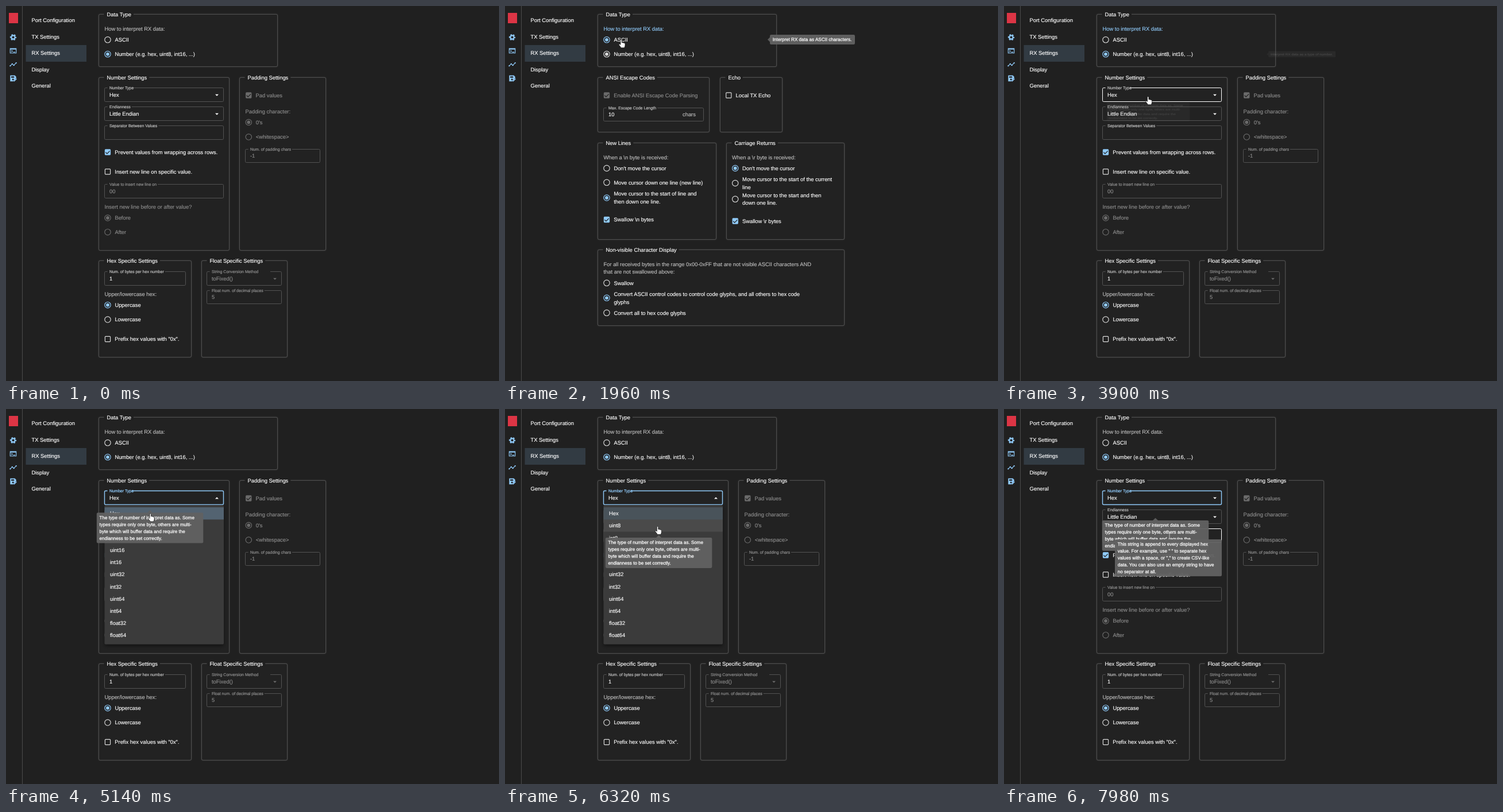
An HTML page for the animation above (8 s loop, 858 by 653 pixels).

```html
<!DOCTYPE html>
<html lang="en">
<head>
<meta charset="utf-8">
<title>RX settings</title>
<style>
  html, body { margin: 0; width: 100%; height: 100%; overflow: hidden; background: #202020; }
  svg { display: block; }
  text { font-family: "Liberation Sans", Arial, sans-serif; font-size: 9.37px; stroke-width: .15px; text-rendering: geometricPrecision; white-space: pre; }
  .label { font-size: 7.05px; stroke-width: .22px; }
  .tip text { font-size: 8.1px; stroke-width: .25px; }
</style>
</head>
<body>
<svg id="stage" width="858" height="653" viewBox="0 0 858 653">
  <defs>
    <filter id="glow" x="-10%" y="-10%" width="120%" height="120%">
      <feDropShadow dx="0" dy="0" stdDeviation="1.2" flood-color="#fff" flood-opacity=".13"/>
    </filter>
    <filter id="shade" x="-10%" y="-10%" width="120%" height="120%">
      <feDropShadow dx="0" dy="3" stdDeviation="3" flood-color="#000" flood-opacity=".45"/>
    </filter>
  </defs>
</svg>
<script>
const BG = '#202020', WHITE = '#fff', SOFT = '#bcbcbc', DIM = '#8c8c8c', OFF = '#6b6b6b',
      LINE = '#535353', BLUE = '#90caf9', RING = '#dcdcdc';
const stage = document.getElementById('stage');
let layer = stage;

function el(tag, attrs, parent = layer) {
  const n = document.createElementNS('http://www.w3.org/2000/svg', tag);
  set(n, attrs);
  parent.appendChild(n);
  return n;
}
function set(n, attrs) {
  for (const k in attrs) n.setAttribute(k, attrs[k]);
}
function group(draw, attrs = {}) {
  const outer = layer, g = el('g', attrs);
  layer = g;
  draw();
  layer = outer;
  return g;
}
const show = (n, on) => n.style.display = on ? '' : 'none';
const snap = v => Math.floor(v) + .5;
const ink = c => ({ fill: c, stroke: c });

// y is the middle of the capitals
function text(x, y, s, color = WHITE, cls = '') {
  const size = cls ? 7.05 : 9.37;
  const n = el('text', { x, y: y + size * .36, class: cls, ...ink(color) });
  n.textContent = s;
  return n;
}
function box(x1, y1, x2, y2, attrs) {
  return el('rect', { x: x1, y: y1, width: x2 - x1, height: y2 - y1, ...attrs });
}
function panel(x1, y1, x2, y2, title) {
  [x1, y1, x2, y2] = [x1, y1, x2, y2].map(snap);
  box(x1, y1, x2, y2, { rx: 2.5, fill: BG, stroke: '#505050', filter: 'url(#glow)' });
  const gap = box(x1 + 9, y1 - 5, x1 + 10, y1 + 5, { fill: BG });
  const t = text(x1 + 14, y1, title);
  gap.setAttribute('width', t.getComputedTextLength() + 9);
}
function field(x1, y1, x2, y2, label, value, { off = false, caret = false, notch = 0 } = {}) {
  [x1, y1, x2, y2] = [x1, y1, x2, y2].map(snap);
  const frame = el('path', { fill: 'none' });
  const name = text(x1 + 8.5, y1 - .5, label, off ? DIM : SOFT, 'label');
  const end = notch || x1 + 10.5 + name.getComputedTextLength();
  frame.setAttribute('d', `M${end} ${y1}H${x2 - 2}q2 0 2 2V${y2 - 2}q0 2-2 2H${x1 + 2}q-2 0-2-2V${y1 + 2}q0-2 2-2H${x1 + 5}`);
  text(x1 + 8.5, (y1 + y2) / 2, value, off ? DIM : WHITE);
  const arrow = caret && el('path', { fill: off ? OFF : WHITE });
  const cx = x2 - 11.5, cy = (y1 + y2) / 2 + .7;
  return {
    state(mode, open) {
      set(frame, {
        stroke: { focus: BLUE, hover: WHITE }[mode] || LINE,
        'stroke-width': mode === 'focus' ? 1.4 : 1
      });
      set(name, ink(mode === 'focus' ? BLUE : off ? DIM : SOFT));
      if (arrow) {
        const s = open ? -1 : 1;
        set(arrow, { d: `M${cx - 3} ${cy - 1.4 * s}h6l-3 ${3 * s}z` });
      }
      return this;
    }
  };
}
const plain = (...a) => field(...a).state();

function radio(x, y, s, on = false, off = false, lines = [y]) {
  const ring = el('circle', { cx: x, cy: y, r: 5.2, fill: 'none', 'stroke-width': 1.15 });
  const dot = el('circle', { cx: x, cy: y });
  [].concat(s).forEach((part, i) => text(x + 12.4, lines[i], part, off ? DIM : WHITE));
  const state = (lit, size) => {
    const c = off ? OFF : lit ? BLUE : RING;
    set(ring, { stroke: c });
    set(dot, { fill: c, r: 2.9 * size });
  };
  state(on, on ? 1 : 0);
  return state;
}
function check(x, y, s, on, off) {
  const c = off ? OFF : on ? BLUE : RING;
  box(x - 4.6, y - 4.6, x + 4.6, y + 4.6, { rx: 1, fill: on ? c : 'none', stroke: c, 'stroke-width': 1.15 });
  if (on) el('path', { d: `M${x - 3.6} ${y + .3}l2.5 2.4 4.8-4.9`, fill: 'none', stroke: BG, 'stroke-width': 1.2 });
  text(x + 12.3, y, s, off ? DIM : WHITE);
}
function icon(y, draw) {
  group(draw, { transform: `translate(5.6 ${y - 6.9}) scale(.575)`, fill: 'none', stroke: BLUE, 'stroke-width': 2 });
}

// Side bar
el('path', { d: 'M28.5 0V653', stroke: '#4a4a4a' });
box(5, 12, 21, 30, { fill: '#dc3545' });
icon(54.5, () => {
  el('circle', { cx: 12, cy: 12, r: 5.5, 'stroke-width': 3.8 });
  el('circle', { cx: 12, cy: 12, r: 8.3, 'stroke-width': 3, 'stroke-dasharray': '5 3.69', 'stroke-dashoffset': 2.5 });
});
icon(78, () => {
  el('path', { d: 'M3 5H21V19H3ZM3 7H21M6.5 10l3 3-3 3M12 16h6' });
});
icon(102, () => {
  el('path', { d: 'M3 16L9 10 14 14 21 7' });
  [[3, 16], [9, 10], [14, 14], [21, 7]].forEach(([cx, cy]) => el('circle', { cx, cy, r: 2, fill: BLUE, stroke: 'none' }));
});
icon(126, () => {
  el('path', { d: 'M3 3H17L21 7V11L12 21H3Z', fill: BLUE, stroke: 'none' });
  el('path', { d: 'M6 6H15V10H6Z', fill: BG, stroke: 'none' });
  el('circle', { cx: 11.5, cy: 15.5, r: 2.6, fill: BG, stroke: 'none' });
  el('path', { d: 'M14 21L22 13', 'stroke-width': 3 });
});
box(34.5, 68, 140, 97, { fill: '#323b43' });
['Port Configuration', 'TX Settings', 'RX Settings', 'Display', 'General']
  .forEach((s, i) => text(44.5, 24.5 + 28.65 * i, s));

// Data type
panel(161.5, 14.5, 472, 105.5, 'Data Type');
const question = text(171.5, 39.5, 'How to interpret RX data:', SOFT);
const asciiRadio = radio(177, 58.8, 'ASCII');
const numberRadio = radio(177, 83.8, 'Number (e.g. hex, uint8, int16, ...)', true);

let kind, endian, separator;
const numberView = group(() => {
  panel(161.5, 124.5, 388, 425, 'Number Settings');
  kind = field(171.5, 142.5, 378.5, 166.5, 'Number Type', 'Hex', { caret: true, notch: 219 });
  endian = field(171.5, 175.5, 378.5, 199.5, 'Endianness', 'Little Endian', { caret: true });
  separator = field(171.5, 208.5, 378.5, 232.5, 'Separator Between Values', '');
  check(177, 254.5, 'Prevent values from wrapping across rows.', true);
  check(177, 288.5, 'Insert new line on specific value.');
  plain(171.5, 310, 378.5, 334, 'Value to insert new line on', '00', { off: true });
  text(171.5, 349.7, 'Insert new line before or after value?', DIM);
  radio(177, 369, 'Before', true, true);
  radio(177, 393.7, 'After', false, true);

  panel(406.5, 124.5, 556.5, 425, 'Padding Settings');
  check(422.3, 155.5, 'Pad values', true, true);
  text(416.5, 183.3, 'Padding character:', DIM);
  radio(422.3, 202.5, "0's", true, true);
  radio(422.3, 228, '<whitespace>', false, true);
  plain(416.5, 249.5, 546.5, 272.5, 'Num. of padding chars', '-1', { off: true });

  panel(161.5, 443.5, 322, 611, 'Hex Specific Settings');
  plain(171.5, 462.5, 312, 486, 'Num. of bytes per hex number', '1');
  text(171.5, 501.5, 'Upper/lowercase hex:', SOFT);
  radio(177, 520.7, 'Uppercase', true);
  radio(177, 546, 'Lowercase');
  check(177, 580, 'Prefix hex values with "0x".');

  panel(340.5, 443.5, 489.5, 611, 'Float Specific Settings');
  plain(349.5, 462.5, 479.5, 486, 'String Conversion Method', 'toFixed()', { off: true, caret: true, notch: 460 });
  plain(349.5, 495, 479.5, 518.5, 'Float num. of decimal places', '5', { off: true });
});

const asciiView = group(() => {
  panel(161.5, 124.5, 355, 219.5, 'ANSI Escape Codes');
  check(177, 155.5, 'Enable ANSI Escape Code Parsing', true, true);
  plain(171.5, 177, 345, 200.5, 'Max. Escape Code Length', '10');
  text(309, 188.7, 'chars', SOFT);
  panel(374, 124.5, 482, 219.5, 'Echo');
  check(389.3, 155.5, 'Local TX Echo');

  panel(161.5, 238.5, 367, 406, 'New Lines');
  text(171.5, 263.3, 'When a \\n byte is received:', SOFT);
  radio(177, 282.5, "Don't move the cursor");
  radio(177, 307.3, 'Move cursor down one line (new line)');
  radio(177, 334, ['Move cursor to the start of line and', 'then down one line.'], true, false, [326.5, 340.5]);
  check(177, 372, 'Swallow \\n bytes', true);

  panel(385.5, 238.5, 590.5, 406, 'Carriage Returns');
  text(395, 263.3, 'When a \\r byte is received:', SOFT);
  radio(400.7, 282.5, "Don't move the cursor", true);
  radio(400.7, 308.5, ['Move cursor to the start of the current', 'line'], false, false, [301.5, 315.2]);
  radio(400.7, 336.3, ['Move cursor to the start and then', 'down one line.'], false, false, [329.3, 343]);
  check(400.7, 374.5, 'Swallow \\r bytes', true);

  panel(161.5, 424.5, 590.5, 556.5, 'Non-visible Character Display');
  text(171.5, 449.5, 'For all received bytes in the range 0x00-0xFF that are not visible ASCII characters AND', SOFT);
  text(171.5, 462.5, 'that are not swallowed above:', SOFT);
  radio(177, 482.3, 'Swallow');
  radio(177, 508.3, ['Convert ASCII control codes to control code glyphs, and all others to hex code', 'glyphs'], true, false, [501.5, 515.2]);
  radio(177, 534.3, 'Convert all to hex code glyphs');
});

// Drop-down list
const ROW = 21.23, rows = [];
const list = group(() => {
  box(171.5, 167.3, 379, 409.8, { rx: 2, fill: '#3a3a3a', filter: 'url(#shade)' });
  ['Hex', 'uint8', 'int8', 'uint16', 'int16', 'uint32', 'int32', 'uint64', 'int64', 'float32', 'float64'].forEach((s, i) => {
    const y = 171.2 + ROW * i;
    rows.push(box(171.5, y, 379, y + ROW, {}));
    text(181, y + ROW / 2, s);
  });
});

// Tooltips are drawn around the point that they grow from
function tooltip(lines, w, h, side) {
  const x = side ? 3.5 : -w / 2, y = side ? -h / 2 : 0;
  return group(() => {
    box(x, y, x + w, y + h, { rx: 2.3, fill: '#616161', 'fill-opacity': .95 });
    el('path', { d: side ? 'M3.5-4L-.5 0l4 4z' : 'M-4.5 0L0-4.2 4.5 0z', fill: '#616161', 'fill-opacity': .95 });
    lines.forEach((s, i) => text(x + 4.7, y + 8 + 11.95 * i, s));
  }, { class: 'tip' });
}
function place(n, x, y, k) {
  show(n, k > 0);
  set(n, { transform: `translate(${x} ${y}) scale(${.75 + .25 * k} ${.5625 + .4375 * k})`, opacity: k });
}
const asciiTip = tooltip(['Interpret RX data as ASCII characters.'], 148, 17, true);
const numberTip = tooltip(['Interpret RX data as a type of number.'], 148, 17, true);
const kindTip = tooltip(['The type of number of interpret data as. Some', 'types require only one byte, others are multi-',
  'byte which will buffer data and require the', 'endianness to be set correctly.'], 185.5, 53);
const separatorTip = tooltip(['This string is append to every displayed hex', 'value. For example, use " " to separate hex',
  'values with a space, or "," to create CSV-like', 'data. You can also use an empty string to have', 'no separator at all.'], 186, 64.3);

// Pointers, tip at 0,0
const pen = { fill: WHITE, stroke: '#111', 'stroke-width': .7, 'stroke-linejoin': 'round' };
const arrow = el('path', { d: 'M0 0V12l2.8-2.6 1.8 4.2 1.9-.8-1.8-4.1H8.4z', ...pen });
const hand = el('path', { d: 'M-2 .6Q-.8-1 .4.6V4.8Q1.6 4 2.5 5.2 3.6 4.5 4.4 5.7 5.8 5.3 6 6.8V9.8Q5.8 11.8 4.6 13.8H-1Q-2.2 11.4-4.6 9-5.4 7.2-3.6 7L-2 8.4Z', ...pen });
const beam = el('path', { d: 'M-2-5H2M0-5V5M-2 5H2', stroke: '#ddd', 'stroke-width': .8, fill: 'none' });

// time, x, y
const path = [
  [520, 815, 650], [800, 520, 330], [1080, 335, 105], [1320, 283, 60], [1390, 283, 60], [1700, 203, 59],
  [2230, 203, 59], [2600, 197, 81], [3700, 197, 81], [3870, 251, 154], [3900, 251.5, 158], [4100, 250.5, 166],
  [5110, 250.5, 166], [5140, 252, 182], [5280, 266, 212], [5350, 268, 218], [5670, 292, 294], [5700, 293, 304],
  [5840, 290, 303], [6120, 273, 231], [6180, 272, 229], [6430, 262, 186], [6720, 262, 186], [6800, 263.5, 180],
  [6880, 263.5, 180], [7050, 268, 180], [7550, 268, 180], [7780, 286, 213], [7950, 288, 221]
];
function pointer(t) {
  const i = path.findIndex(p => p[0] > t);
  if (i === 0) return path[0].slice(1);
  if (i < 0) return path[path.length - 1].slice(1);
  const [t0, x0, y0] = path[i - 1], [t1, x1, y1] = path[i], k = (t - t0) / (t1 - t0);
  return [x0 + (x1 - x0) * k, y0 + (y1 - y0) * k];
}
const ramp = (t, from, span) => Math.max(0, Math.min(1, (t - from) / span));
const within = (t, a, b) => t >= a && t < b;

const TO_ASCII = 1900, TO_NUMBER = 3230, OPEN = 4580, CLOSE = 6850, LAG = 30;

function render(t) {
  const [x, y] = pointer(t);
  const ascii = within(t, TO_ASCII, TO_NUMBER), open = within(t, OPEN, CLOSE);

  show(asciiView, ascii);
  show(numberView, !ascii);
  set(question, ink(within(t, TO_ASCII, OPEN) ? BLUE : SOFT));
  const picked = ramp(t, TO_ASCII, 50) * (1 - ramp(t, TO_NUMBER + 40, 110));
  const other = (1 - ramp(t, TO_ASCII + 100, 60)) + ramp(t, TO_NUMBER, 50);
  asciiRadio(ascii, picked);
  numberRadio(!ascii, other);

  kind.state(t >= OPEN ? 'focus' : within(t, 3880, OPEN) ? 'hover' : '', open);
  endian.state(within(t, 6950, 7620) ? 'hover' : '');
  separator.state(t >= 7760 ? 'hover' : '');

  const k = ramp(t, OPEN, 200) * (1 - ramp(t, CLOSE, 150));
  show(list, k > 0);
  const grow = t < CLOSE ? k : 1;
  set(list, { opacity: k, transform: `translate(275 167.3) scale(${.75 + .25 * grow} ${.5625 + .4375 * grow}) translate(-275 -167.3)` });
  const over = Math.floor((y - 171.2) / ROW);
  rows.forEach((r, i) => set(r, i
    ? { fill: WHITE, 'fill-opacity': i === over ? .08 : 0 }
    : { fill: BLUE, 'fill-opacity': t < 5200 ? .28 : .16 }));

  place(asciiTip, 457.5, 58.6, ramp(t, 1430, 200) * (1 - ramp(t, 2400, 150)));
  place(numberTip, 457.5, 84, ramp(t, 2440, 200) * (1 - ramp(t, 3800, 120)));
  const [kx, ky] = pointer(Math.min(t - LAG, CLOSE));
  place(kindTip, kx, ky + 14, ramp(t, 3878, 190));
  place(separatorTip, 286, 227, ramp(t, 7780, 180));

  const at = { transform: `translate(${x} ${y})` };
  [arrow, hand, beam].forEach(n => set(n, at));
  show(arrow, within(t, 520, 1260));
  show(hand, within(t, 1260, 7740));
  show(beam, t >= 7740);
}

const start = performance.now();
(function frame() {
  render((performance.now() - start) % 8000);
  requestAnimationFrame(frame);
})();
</script>
</body>
</html>
```
